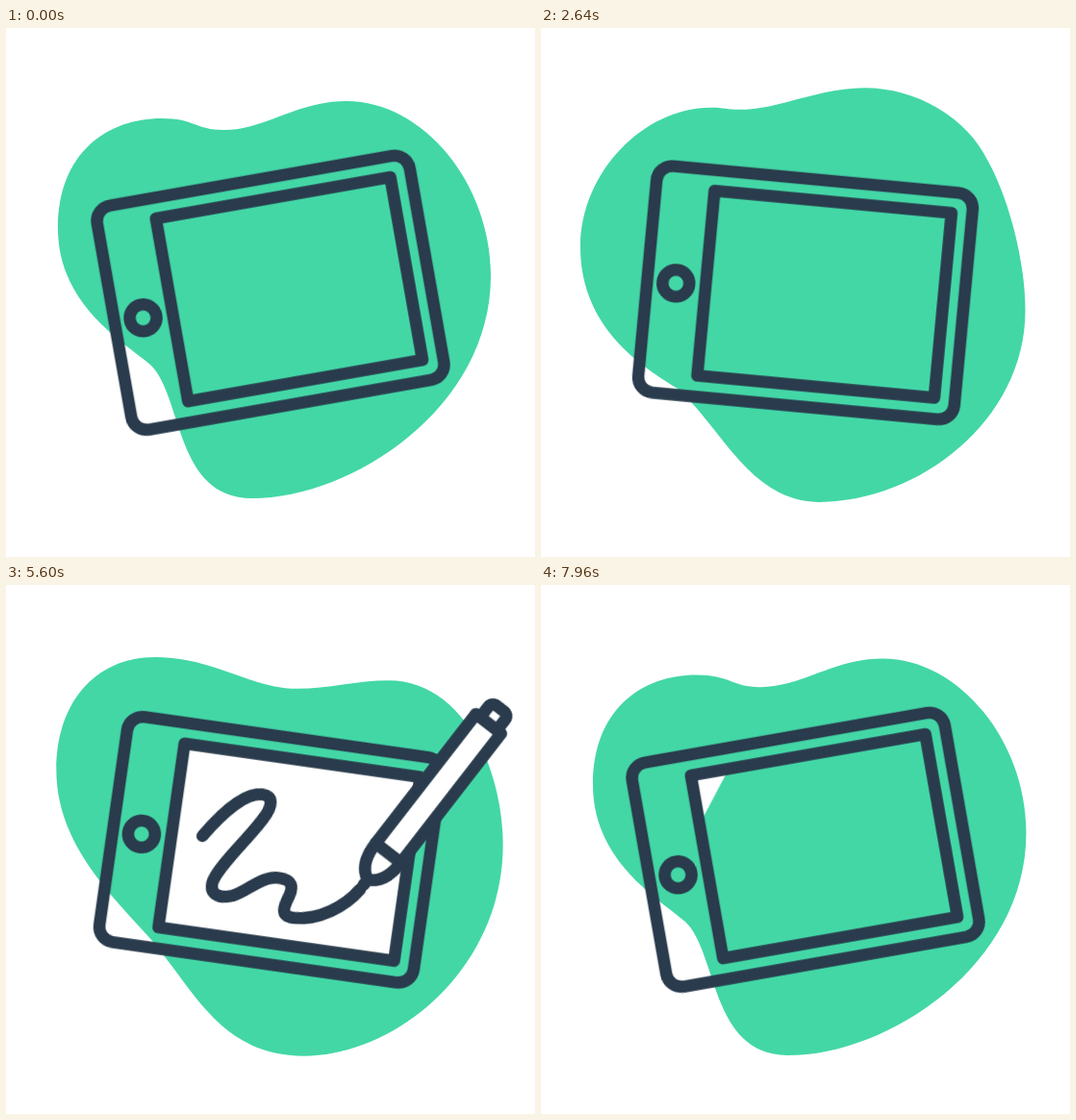
An HTML page without scripts for the animation above (8000 ms loop, 550x550 px).

```html
<!DOCTYPE html>
<html lang="en">
<head>
<meta charset="utf-8">
<title>Tablet sketch</title>
<style>
  html, body { margin: 0; width: 100%; height: 100%; overflow: hidden; background: #fff; }
  svg { display: block; width: 100vw; height: 100vh; }

  .line { fill: none; stroke: #293b4c; stroke-width: 12.6; stroke-linejoin: round; stroke-linecap: round; }
  .paper { fill: #fff; }

  .blob, .tablet, .ink, .wipe, .size, .turn { animation: 8s linear infinite; }
  .blob { fill: #43d7a6; animation-name: blob; }
  .tablet {
    transform-origin: 275px 275px;
    animation-name: rock;
    animation-duration: 4s;
    animation-timing-function: cubic-bezier(.3642, 0, .6358, 1);
  }
  .ink { stroke-dasharray: 1 2; animation-name: ink; }
  .wipe { animation-name: wipe; }
  .size { animation-name: size; }
  .turn { animation-name: turn; }

  @keyframes rock {
    0%, 100% { transform: rotate(-10deg); }
    50% { transform: rotate(10deg); }
  }

  /* pen pops in, tilts, and leaves the same way */
  @keyframes size {
    0% { transform: scale(0); }
    43.6% { transform: scale(0); animation-timing-function: cubic-bezier(.175, .885, .32, 1.275); }
    52.4% { transform: scale(1); }
    88.75% { transform: scale(1); animation-timing-function: cubic-bezier(.6, -.28, .735, .045); }
    97.5%, 100% { transform: scale(0); }
  }
  @keyframes turn {
    0% { transform: rotate(0deg); }
    43.6% { transform: rotate(0deg); animation-timing-function: cubic-bezier(.25, .46, .45, .94); }
    52.4% { transform: rotate(29.7deg); }
    88.75% { transform: rotate(29.7deg); animation-timing-function: ease-in-out; }
    97.5%, 100% { transform: rotate(0deg); }
  }

  @keyframes ink {
    0% { stroke-dashoffset: 1.03; }
    50% { stroke-dashoffset: 1.03; animation-timing-function: cubic-bezier(.3642, 0, .6358, 1); }
    65.8%, 100% { stroke-dashoffset: 0; }
  }

  /* white page slides along the screen diagonal */
  @keyframes wipe {
    0% { x: -320px; }
    45% { x: -320px; animation-timing-function: cubic-bezier(.25, .46, .45, .94); }
    52.5% { x: 0px; }
    92.5% { x: 0px; animation-timing-function: cubic-bezier(.55, .085, .68, .53); }
    100% { x: -320px; }
  }

  @keyframes blob {
    0%, 100% { d: path("M54 208 C54 130 105 94 162 94 C196 94 197 106 226 106 C270 106 302 76 354 76 C394 76 431.5 97.5 459 131 C486.5 164.5 504 210 504 258 C504 395 360 489 256 489 C175 489 184 382 150 350 C122 326 54 288 54 208Z"); }
    25% { d: path("M40 228 C40 149 114 84 183 84 C194 84 190 84 197 84 C241 84 293 48.5 350 48.5 C393.5 48.5 435 79 466 122 C497 165.5 516.5 221.5 516.5 273 C516.5 401 391 490 280 490 C198 490 184 391 140 364 C105 350 40 318 40 228Z"); }
    50% { d: path("M43 228 C43 150 94 80 162 80 C184 80 199 86.5 228 86.5 C258 86.5 283 91.5 307.5 91.5 C383 91.5 459 121.5 462 173 C463 202 476 282 476 338 C476 425 393.5 499 309 499 C257 499 191.5 458.5 144 396.5 C121 365 43 308 43 228Z"); }
    60% { d: path("M51 212 C51 140 106 84 175 84 C205 84 225 97.5 268 97.5 C295 97.5 325 95.5 354 95.5 C412 95.5 464 118 479 180 C486 208 496 262 496 305 C496 413 404 493 309 493 C240 493 195 443 147 385 C116 347 51 295 51 212Z"); }
    75% { d: path("M53 182 C53 118 82 70.5 146 70.5 C221 70.5 269 113 320.5 113 C354 113 385.5 101 420 101 C454 101 480 132 506 173 C521 200 527 226 527 253 C527 390 408 488 310 488 C211 488 193 403 147 354 C103 307 53 254 53 182Z"); }
  }
</style>
</head>
<body>
<svg viewBox="0 0 550 550">
  <defs>
    <clipPath id="page">
      <rect class="wipe" x="-320" y="-250" width="320" height="500" transform="translate(171 178.5) rotate(37.8)"/>
    </clipPath>
  </defs>

  <path class="blob"/>

  <g class="tablet">
    <g clip-path="url(#page)">
      <rect class="paper" x="171" y="178.5" width="247.5" height="193"/>
      <path id="scribble" class="line ink" pathLength="1" d="M203 271 C222 241 242 220 258 219.5 C270 219 272 229 262 246 C250 268 222 302 220 318 C219 331 231 333 243 328 C258 321 270 303 288 303 C302 303 304 310 301 320 C297 332 294 342 309 342 C335 341 360 323 373 303"/>
    </g>

    <rect class="line" x="110" y="157" width="330" height="236.5" rx="16"/>
    <rect class="line" x="171" y="178.5" width="247.5" height="193"/>
    <circle class="line" cx="140" cy="278" r="14"/>

    <g>
      <animateMotion dur="8s" repeatCount="indefinite" calcMode="spline"
        keyPoints="0;0;1;1" keyTimes="0;.5;.658;1"
        keySplines="0 0 1 1;.3642 0 .6358 1;0 0 1 1">
        <mpath href="#scribble"/>
      </animateMotion>
      <g class="turn">
        <g class="size">
          <g class="line" style="stroke-width:12.6px;fill:#fff">
            <rect x="-11" y="-238" width="22" height="20" rx="6"/>
            <path d="M-16.5 -48 C-16.5 -30 -11 -18 0 -13 C11 -18 16.5 -30 16.5 -48Z M0 -13 V-6"/>
            <rect x="-16.5" y="-218" width="33" height="170"/>
          </g>
        </g>
      </g>
    </g>
  </g>
</svg>
</body>
</html>
```
